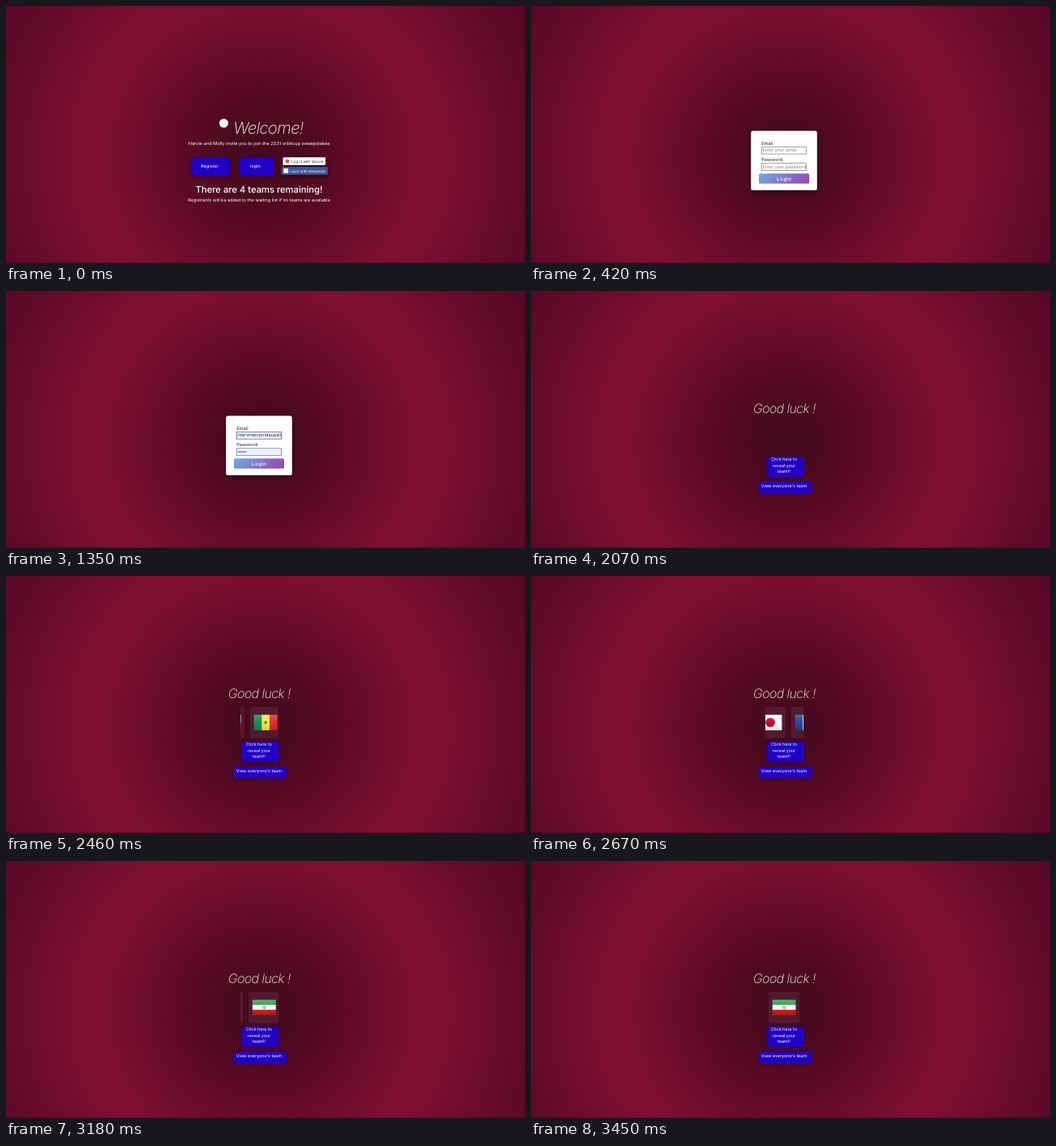
These frames come from a looping animation (640 px wide and 318 px high, 3480 ms). An HTML page:

```html
<!DOCTYPE html>
<html lang="en">
<head>
<meta charset="utf-8">
<title>Sweepstakes</title>
<style>
  html, body { margin: 0; width: 100%; height: 100%; overflow: hidden; background: #5c0926; }
  svg { display: block; width: 100vw; height: 100vh; }
  text { font-family: Inter, "Open Sans", sans-serif; fill: #fff; text-rendering: geometricPrecision; white-space: pre; }
  .title { font-weight: 200; font-style: italic; letter-spacing: -.5px; }
  .mid { text-anchor: middle; }
  .dark { fill: #222; }
  .hint { fill: #808080; }
</style>
</head>
<body>
<svg id="stage" viewBox="0 0 640 318" preserveAspectRatio="none">
  <defs>
    <radialGradient id="bg" gradientUnits="userSpaceOnUse" cx="314" cy="186" r="380">
      <stop offset="0" stop-color="#430a1d"/>
      <stop offset=".1" stop-color="#490a1f"/>
      <stop offset=".22" stop-color="#580923"/>
      <stop offset=".36" stop-color="#6a0c2a"/>
      <stop offset=".53" stop-color="#7f1031"/>
      <stop offset=".62" stop-color="#7a0f30"/>
      <stop offset=".84" stop-color="#620a29"/>
      <stop offset="1" stop-color="#560825"/>
    </radialGradient>
    <linearGradient id="loginFill" x1="0" y1="0" x2="1" y2=".2">
      <stop offset="0" stop-color="#6fabe0"/>
      <stop offset="1" stop-color="#8f53b8"/>
    </linearGradient>
    <linearGradient id="gloss" x1="0" y1="0" x2="0" y2="1">
      <stop offset="0" stop-color="#fff" stop-opacity=".22"/>
      <stop offset=".5" stop-color="#fff" stop-opacity=".04"/>
      <stop offset="1" stop-color="#000" stop-opacity=".12"/>
    </linearGradient>
    <filter id="glow" x="-30%" y="-50%" width="160%" height="200%">
      <feDropShadow dx="0" dy="1" stdDeviation="2" flood-color="#1c0078" flood-opacity=".6"/>
    </filter>
    <filter id="shade" x="-30%" y="-30%" width="160%" height="170%">
      <feDropShadow dx="0" dy="2" stdDeviation="3" flood-color="#000" flood-opacity=".5"/>
    </filter>
    <clipPath id="window"><rect x="289" y="160" width="47" height="42"/></clipPath>
    <clipPath id="field"><rect x="284.5" y="174" width="55" height="30"/></clipPath>
    <clipPath id="flag"><rect width="30" height="20" rx=".6"/></clipPath>
  </defs>
  <rect width="640" height="318" fill="url(#bg)"/>
  <rect y="317" width="640" height="1" fill="#200010" opacity=".25"/>
  <g id="welcome"></g>
  <g id="login"></g>
  <g id="luck"></g>
</svg>
<script>
const LOOP = 3480, PITCH = 45, REST_X = 293;
const $ = id => document.getElementById(id);

const rect = (x, y, w, h, fill, more = '') =>
  `<rect x="${x}" y="${y}" width="${w}" height="${h}" fill="${fill}" ${more}/>`;
const circle = (x, y, r, fill) => `<circle cx="${x}" cy="${y}" r="${r}" fill="${fill}"/>`;
const path = (d, fill) => `<path d="${d}" fill="${fill}"/>`;
const label = (x, y, size, str, cls = 'mid', more = '') =>
  `<text x="${x}" y="${y}" font-size="${size}" class="${cls}" ${more}>${str}</text>`;
const button = (x, y, w, h) => rect(x, y, w, h, '#2400c6', 'rx="2.5" filter="url(#glow)"');

function star(x, y, r, fill) {
  const pts = Array.from({ length: 10 }, (_, i) => {
    const a = i * Math.PI / 5, q = i % 2 ? r * .4 : r;
    return `${(x + q * Math.sin(a)).toFixed(2)},${(y - q * Math.cos(a)).toFixed(2)}`;
  });
  return `<polygon points="${pts.join(' ')}" fill="${fill}"/>`;
}

// Flags are drawn on a 30 x 20 cloth.
const across = (...c) => c.map((f, i) => rect(0, i * 20 / c.length, 30, 20 / c.length, f)).join('');
const down = (...c) => c.map((f, i) => rect(i * 30 / c.length, 0, 30 / c.length, 20, f)).join('');
const cross = (cloth, f, x, w) =>
  rect(0, 0, 30, 20, cloth) + rect(x, 0, w, 20, f) + rect(0, 10 - w / 2, 30, w, f);

function usa() {
  let s = '';
  for (let i = 0; i < 13; i++) s += rect(0, 2 + i * 16 / 13, 30, 16 / 13, i % 2 ? '#f4f2f2' : '#c0213a');
  s += rect(0, 2, 12.5, 8.6, '#3b4a82');
  for (let r = 0; r < 5; r++)
    for (let c = 0; c < 6; c++) s += circle(1.2 + c * 2, 3 + r * 1.65, .42, '#e8eaf4');
  return s;
}

function iran() {
  const arc = 'a1.9 2 0 0 0 0 3.8';
  return across('#2a9a48', '#f6f6f4', '#cc1414') +
    `<g fill="none" stroke="#4d7a4c" stroke-width=".6"><path d="M14.4 8.1${arc}M15.6 8.1a1.9 2 0 0 1 0 3.8M15 7.8v4.6"/></g>`;
}

const flags = [
  down('#0b7a3d', '#fff', '#d02030'),
  cross('#c8102e', '#fff', 9, 3),
  down('#1c1c1c', '#f7d918', '#e03038'),
  across('#1c1c1c', '#d81e1e', '#f4c81c'),
  rect(0, 0, 30, 20, '#c8202c') + rect(0, 5, 30, 10, '#f5c21a'),
  cross('#fff', '#ce1124', 13, 4),
  across('#d8222c', '#fff', '#1c3f94'),
  across('#f6f6f6', '#d4213d'),
  down('#0c8a45', '#fbe33c', '#e0202c') + star(15, 10.2, 3, '#0c7a3c'),
  across('#b01c2e', '#fff', '#21468b'),
  rect(0, 0, 30, 20, '#fafafa') + circle(15, 10, 6, '#bc002d'),
  down('#1c3f94', '#fff', '#e02a38'),
  usa(),
  iran()
];
const whole = new Set([usa()]);

const cloth = art => {
  const [y, h] = whole.has(art) ? [2, 16] : [0, 20];
  return `<g transform="translate(4.5 9.5) scale(.97)" clip-path="url(#flag)">${art}${rect(0, y, 30, h, 'url(#gloss)')}</g>`;
};

$('welcome').innerHTML =
  circle(268.5, 145, 5.5, '#fff') +
  label(323.7, 157.8, 20, 'Welcome!', 'mid title') +
  label(312, 171.7, 5.65, 'Harvie and Molly invite you to join the 2031 orbitcup sweepstakes') +
  button(229, 188, 47, 22) + label(251, 199.5, 5.6, 'Register') +
  button(288, 188, 42, 22) + label(307.5, 199.5, 5.6, 'login') +
  rect(341.5, 187.3, 52.5, 9.7, '#fff', 'rx=".8" filter="url(#shade)"') +
  circle(347, 192.1, 2.4, '#dd4b3e') +
  label(352.3, 193.8, 4.45, 'Log in with Quovle', 'dark') +
  rect(339.7, 199, 57, 9.8, '#3b5998', 'rx=".8" filter="url(#shade)"') +
  rect(342.3, 201, 5.7, 5.7, '#fff') +
  label(349.3, 205.5, 4.35, 'Log in with Hamplode', '') +
  label(312, 231, 11.2, 'There are 4 teams remaining!', 'mid', 'font-weight="500"') +
  label(312, 241.8, 5.5, 'Registrants will be added to the waiting list if no teams are available');

const dots = Array.from({ length: 5 }, (_, i) => circle(286.8 + i * 2.1, 199.1, .75, '#14204a')).join('');
const box = (id, y) => rect(284.3, y, 55.2, 8.8, '#fff', `id="${id}" stroke="#767676" stroke-width=".7"`);

$('login').innerHTML =
  rect(271.3, 154.4, 81.4, 73.6, '#fff', 'rx="2.5" filter="url(#shade)"') +
  label(284.2, 171.8, 5.7, 'Email', 'dark') + box('email', 174.3) +
  label(284.2, 192.2, 5.6, 'Password', 'dark') + box('pass', 194.7) +
  `<g id="hints" clip-path="url(#field)">${label(285.7, 180.4, 5.5, 'Enter your email', 'hint')}${label(285.7, 200.8, 5.5, 'Enter your password', 'hint')}</g>` +
  `<g id="typed" clip-path="url(#field)">${label(285.7, 180.4, 5.6, 'marvinleopoldquastnor', '', 'style="fill:#14204a"')}${dots}</g>` +
  rect(281, 207.2, 62, 12.6, 'url(#loginFill)', 'id="go" rx="1.6"') +
  label(312.3, 215.5, 6, 'Login', 'mid', 'font-weight="500" letter-spacing=".5"');

$('luck').innerHTML =
  label(312.4, 151.2, 15.8, 'Good luck !', 'mid title') +
  `<g id="reel" clip-path="url(#window)"><g id="strip">${flags.map((art, i) =>
    `<g transform="translate(${i * PITCH} 162)">${rect(0, 0, 38, 38.5, '#fff', 'rx="3" opacity=".07"')}${cloth(art)}</g>`).join('')}</g></g>` +
  button(291, 205.3, 45, 24.4) +
  ['Click here to', 'reveal your', 'team!!'].map((s, i) => label(312, 210 + i * 7.6, 5.4, s)).join('') +
  button(281.3, 236.3, 64.2, 13.7) + label(312, 243, 5.4, "View everyone's team");

const show = (id, on) => $(id).setAttribute('display', on ? 'inline' : 'none');
const clamp = v => Math.max(0, Math.min(1, v));

function paintLogin(t) {
  const filled = t >= 1050, focus = t >= 990 && t < 1380;
  show('hints', !filled);
  show('typed', filled);
  $('email').setAttribute('fill', filled && !focus ? '#e8f0fe' : '#fff');
  $('email').setAttribute('stroke', focus ? '#30489a' : '#767676');
  $('pass').setAttribute('fill', filled ? '#e8f0fe' : '#fff');
  const hover = clamp((t - 1380) / 210), press = t >= 1800 && t < 1860 ? .05 : 0;
  $('go').style.filter = `brightness(${1 + .05 * hover - press})`;
}

function paintReel(t) {
  const left = 42 * Math.pow((LOOP - t) / 570, 2.95);
  show('reel', t >= 2095);
  $('strip').setAttribute('transform', `translate(${(REST_X - (flags.length - 1) * PITCH + left).toFixed(2)} 0)`);
}

function paint(t) {
  show('welcome', t < 420);
  show('login', t >= 420 && t < 2070);
  show('luck', t >= 2070);
  if (t >= 2070) paintReel(t);
  else if (t >= 420) paintLogin(t);
}

const start = performance.now();
function tick() {
  paint((performance.now() - start) % LOOP);
  requestAnimationFrame(tick);
}
paint(0);
requestAnimationFrame(tick);
</script>
</body>
</html>
```
